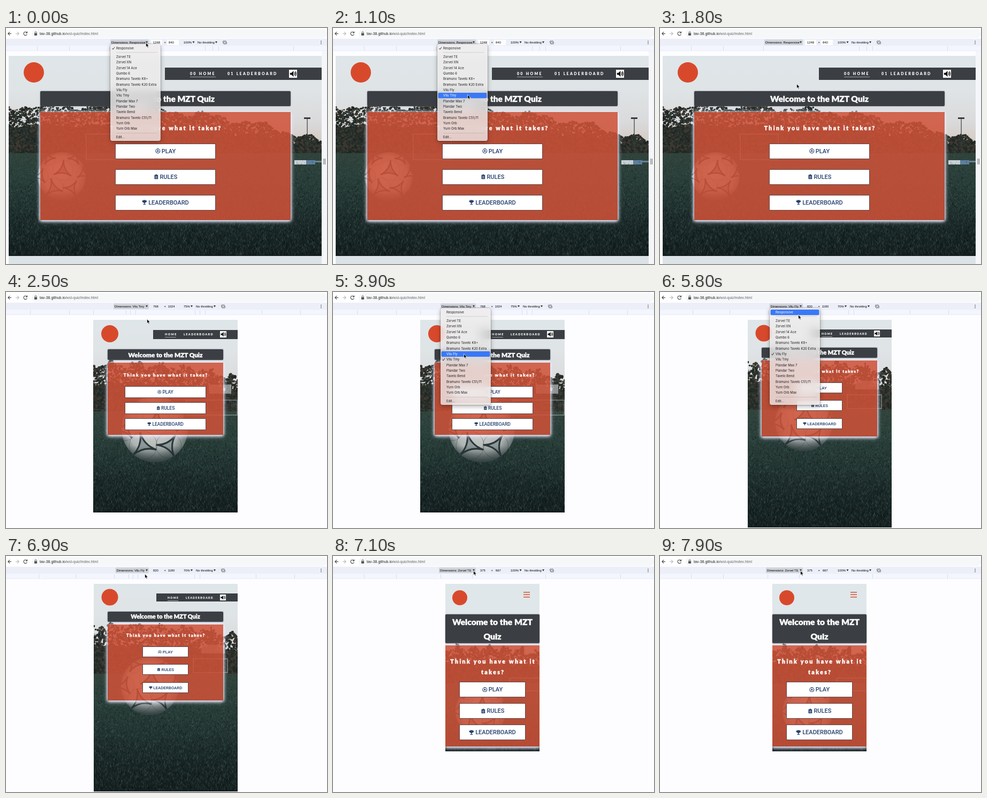
An HTML page with a canvas that plays this animation: 600x441 px, repeating every 8 s.

```html
<!DOCTYPE html>
<html lang="en">
<head>
<meta charset="utf-8">
<title>Responsive quiz page</title>
<style>
html, body { margin: 0; width: 100%; height: 100%; overflow: hidden; background: #fdfdff; }
#stage { position: relative; width: 600px; height: 441px; overflow: hidden; }
#stage > *, .scene > * { position: absolute; left: 0; top: 0; }
.ui { font-family: "Liberation Sans", Arial, sans-serif; }
.page { font-family: Lato, "Open Sans", sans-serif; font-weight: 900; fill: #fff; }
.bold { stroke: #fff; stroke-width: .4px; }
.glow { filter: drop-shadow(0 1px 2.5px #eef0ff) drop-shadow(0 1px 3px #e2e6ff); }
.scene .btn {
  box-sizing: border-box; display: flex; align-items: center; justify-content: center;
  background: #fff; border: 1px solid #5d4a4d; color: #25406f; fill: #25406f;
  font-family: Roboto, Arial, sans-serif; font-weight: 500; white-space: nowrap;
}
#menu {
  top: 30px; width: 94px; height: 181px; border-radius: 4px;
  background: rgba(238, 235, 236, .8); backdrop-filter: blur(9px);
  box-shadow: 0 0 0 .5px rgba(0, 0, 0, .35), 0 3px 8px rgba(0, 0, 0, .3);
  font-family: Inter, "Open Sans", sans-serif; font-size: 6px;
}
</style>
</head>
<body>
<div id="stage"></div>
<script>
const W = 600, H = 441, LOOP = 8000, STEP = 100;
const stage = document.getElementById('stage');
const WELCOME = 'Welcome to the MZT Quiz';
const ASK = 'Think you have what it takes?';

const ROWS = ['Responsive', 'Zorvel TE', 'Zorvel XN', 'Zorvel 14 Ace', 'Qumbo 6',
  'Bramuno Tavelo K8+', 'Bramuno Tavelo K20 Extra', 'Vilu Fly', 'Vilu Tiny',
  'Plandar Max 7', 'Plandar Two', 'Tavelo Bend', 'Bramuno Tavelo C51/71',
  'Yurn Orb', 'Yurn Orb Max', 'Edit...'];
const rowY = i => i === 0 ? 8 : i === 15 ? 173.5 : 24 + (i - 1) * 10.31;

const SCENES = [
  { from: 0, row: 0, size: [1248, 840], zoom: '100%', labelX: 197, menuX: 195,
    ticks: [58, 118, 193, 372, 386, 397, 537], page: [5, 52, 585, 374],
    logo: [52, 83, 19], nav: [297, 74, 293, 23], navFont: [7, 2.3, 88],
    links: [[344, '00 HOME', 48], [414, '01 LEADERBOARD']], icon: [529, 78, 15],
    title: [64, 118, 468, 28], head: [15.5, [138, WELCOME]],
    panel: [64, 157, 468, 202], ask: [10.5, 2.4, [191, ASK]],
    btn: [204, 188, 29, 11], btnY: [215.5, 263.5, 311.5],
    photo: { horizon: 236, trees: [146, 214], ball: [104, 277, 45], goal: [150, 221, 198, 48] } },
  { from: 1900, row: 8, size: [768, 1024], zoom: '75%', labelX: 203, menuX: 201,
    ticks: [45, 118, 163, 224, 232, 242, 353, 362, 372, 478, 550], page: [163, 52, 270, 360],
    logo: [194, 78, 16], nav: [275, 71, 158, 17], navFont: [5.5, 1.4, 81],
    links: [[297, 'HOME', 21], [332, 'LEADERBOARD']], icon: [400, 73, 12],
    title: [190, 107, 216, 20], head: [11.7, [122, WELCOME]],
    panel: [190, 132, 216, 135], ask: [8, 1.8, [158, ASK]],
    btn: [222, 152, 22, 8.5], btnY: [176, 206, 236],
    photo: { horizon: 225, trees: [135, 162], ball: [278, 256, 62], goal: [337, 432, 202, 28], board: [379, 173, 42, 17] } },
  { from: 4500, row: 7, size: [820, 1180], zoom: '70%', labelX: 206.5, menuX: 205,
    ticks: [61, 130, 202, 229, 237, 246, 352, 362, 467, 539], page: [164, 52, 269, 388],
    logo: [194, 77, 15.5], nav: [281, 70, 152, 15], navFont: [5.1, 1.3, 80],
    links: [[302, 'HOME', 20], [336, 'LEADERBOARD']], icon: [400, 72, 11],
    title: [190, 104, 216, 19], head: [10.9, [117, WELCOME]],
    panel: [190, 128, 216, 142], ask: [7.4, 1.7, [151, ASK]],
    btn: [255, 86, 20, 7.9], btnY: [169, 202, 236],
    photo: { horizon: 222, trees: [130, 150], ball: [269, 243, 54], goal: [350, 414, 192, 26], board: [365, 166, 44, 16] } },
  { from: 7000, row: 1, size: [375, 667], zoom: '100%', labelX: 200, menuX: 198,
    ticks: [58, 118, 201, 260, 397, 537], page: [210, 52, 176, 313],
    logo: [237, 78, 14],
    title: [210, 109, 176, 54], head: [15.7, [129, 'Welcome to the MZT'], [156, 'Quiz']],
    panel: [210, 167, 176, 189], ask: [10.5, 2.4, [201, 'Think you have what it'], [221, 'takes?']],
    btn: [236, 124, 29, 11], btnY: [235, 275, 315],
    photo: { horizon: 240, trees: [172, 182], ball: [276, 290, 47], goal: [330, 386, 228, 24] } }
];

const ICONS = {
  PLAY: '<circle cx="8" cy="8" r="6.6" fill="none" stroke="#25406f" stroke-width="1.8"/><path d="M8 5l2.800 2.100-1 3.200H6.200L5.200 7.100zM7.500 1h1v2h-1zM2 10l1.800-.6.4 1-1.500 1zM14 10l-1.800-.6-.4 1 1.500 1z"/>',
  RULES: '<path d="M2.500 2.500H6a2 2 0 0 1 4 0h3.500V15.500h-11z"/><path d="M5 7h6M5 9.500h6M5 12h6" stroke="#fff"/>',
  LEADERBOARD: '<path d="M4 1h8v1.500h3.500c0 4-2 5.500-4 5.800L9 10.500V13h3v2H4v-2h3v-2.500L4.500 8.300C2.500 8 .5 6.500.5 2.500H4z"/>'
};

const svg = (body, cls = '', w = W, h = H) =>
  `<svg class="${cls}" width="${w}" height="${h}" viewBox="0 0 ${w} ${h}">${body}</svg>`;
const rect = ([x, y, w, h], fill, more = '') =>
  `<rect x="${x}" y="${y}" width="${w}" height="${h}" fill="${fill}" ${more}/>`;
const text = (x, y, size, str, more = '') =>
  `<text x="${x}" y="${y}" font-size="${size}" ${more}>${str}</text>`;
const path = (d, more = '') => `<path d="${d}" ${more}/>`;
const line = (d, color, width = 1) => path(d, `fill="none" stroke="${color}" stroke-width="${width}"`);
const add = (tag, parent = stage) => parent.appendChild(document.createElement(tag));

function seeded(seed) {
  return () => {
    seed = seed + 0x6D2B79F5 | 0;
    let t = Math.imul(seed ^ seed >>> 15, 1 | seed);
    t = t + Math.imul(t ^ t >>> 7, 61 | t) ^ t;
    return ((t ^ t >>> 14) >>> 0) / 4294967296;
  };
}

function fade(c, y0, y1, colors) {
  const g = c.createLinearGradient(0, y0, 0, y1);
  colors.forEach((col, i) => g.addColorStop(i / (colors.length - 1), col));
  return g;
}

function drawTrees(c, rnd, [x, , w], { horizon, trees: [left, right] }) {
  const top = u => left + (right - left) * u ** 3 + 5 * Math.sin(u * 37) + 3 * Math.sin(u * 90);
  c.fillStyle = '#262d29';
  for (let i = 0; i < w; i++) {
    const y = top(i / w);
    c.fillRect(x + i, y + (horizon - y) * .4, 1, horizon - y);
  }
  for (let i = 0; i < w * 14; i++) {
    const u = rnd(), y = top(u);
    c.fillStyle = ['#242b27', '#2b312c', '#1d2624', '#43382f', '#353c35'][rnd() * 5 | 0];
    c.beginPath();
    c.arc(x + u * w, y + (horizon - y) * rnd(), .6 + rnd() * 2, 0, 7);
    c.fill();
  }
}

function drawGrass(c, rnd, x, y, w, h) {
  for (let i = 0; i < w * h / 9; i++) {
    const d = rnd(), px = x + rnd() * w, py = y + d * h, len = 1 + d * 4;
    c.strokeStyle = rnd() < .5 ? 'rgba(125,158,146,.17)' : 'rgba(3,10,10,.3)';
    c.beginPath();
    c.moveTo(px, py);
    c.lineTo(px + (rnd() - .5) * len * 1.5, py - len);
    c.stroke();
  }
}

function drawBall(c, [x, y, r]) {
  c.save();
  c.translate(x, y);
  c.scale(r, r);
  const g = c.createRadialGradient(-.2, -.3, .1, 0, 0, 1);
  g.addColorStop(0, '#d8dad6');
  g.addColorStop(.75, '#aeb5b2');
  g.addColorStop(1, '#667272');
  c.fillStyle = g;
  c.beginPath();
  c.arc(0, 0, 1, 0, 7);
  c.fill();
  c.clip();
  // Curved three-pointed panels with a light core.
  for (const [px, py, s, a] of [[-.35, .5, .42, .3], [.42, .5, .38, 1.1], [.9, -.1, .3, .5], [-.9, 0, .35, .9], [.05, -.25, .42, .6], [-.55, -.75, .3, 0], [.55, -.75, .3, 1]]) {
    const at = (k, q) => [px + q * Math.cos(a + k * Math.PI / 3), py + q * Math.sin(a + k * Math.PI / 3)];
    c.beginPath();
    c.moveTo(...at(0, s));
    for (let k = 1; k < 6; k += 2) c.quadraticCurveTo(...at(k, s * .05), ...at(k + 1, s));
    c.fillStyle = '#8d9898';
    c.fill();
    c.strokeStyle = '#2b363a';
    c.lineWidth = .05;
    c.stroke();
    c.beginPath();
    c.arc(px, py, s, 0, 7);
    c.strokeStyle = 'rgba(60,72,76,.5)';
    c.lineWidth = .015;
    c.stroke();
  }
  c.fillStyle = fade(c, .5, 1, ['rgba(28,42,42,0)', 'rgba(28,42,42,.7)']);
  c.fillRect(-1, .5, 2, .5);
  c.restore();
}

function drawPhoto(canvas, { page, photo }, seed) {
  canvas.width = W;
  canvas.height = H;
  const c = canvas.getContext('2d'), rnd = seeded(seed);
  const [x, y, w, h] = page, { horizon, ball, goal, board } = photo, bottom = y + h;
  c.beginPath();
  c.rect(x, y, w, h);
  c.clip();
  c.fillStyle = fade(c, y, horizon, ['#dfe6e9', '#dfe4e6', '#dadadb', '#d2c2b6']);
  c.fillRect(x, y, w, h);
  drawTrees(c, rnd, page, photo);
  c.fillStyle = fade(c, horizon - 4, bottom, ['#31443c', '#2a3f3a', '#223431', '#192726', '#141e1f']);
  c.fillRect(x, horizon - 2, w, h);
  if (w > 300) {
    c.fillStyle = '#353a3c';
    c.fillRect(562.5, 168, 1.2, 66);
    c.fillRect(557, 167, 12, 3);
    c.fillStyle = '#c9d2d8';
    c.fillRect(539, 247, 39, 8);
    c.fillStyle = '#5c7f9c';
    c.fillRect(561, 247, 17, 8);
    c.fillStyle = '#6d8391';
    c.fillRect(578, 248, 12, 3);
  }
  drawGrass(c, rnd, x, horizon, w, bottom - horizon);
  if (board) {
    c.fillStyle = 'rgba(205,212,214,.6)';
    c.fillRect(...board);
  }
  const [gx, gr, gy, gh] = goal;
  c.strokeStyle = 'rgba(225,232,232,.65)';
  c.strokeRect(gx, gy, gr - gx, gh);
  c.strokeStyle = 'rgba(225,235,235,.1)';
  for (let i = gx; i < gr; i += 4) { c.beginPath(); c.moveTo(i, gy); c.lineTo(i, gy + gh); c.stroke(); }
  drawBall(c, ball);
}

const caret = x => path(`M${x} 25h4l-2 3.600z`, 'fill="#333"');

function toolbar(s) {
  const wide = s.zoom === '100%', tx = wide ? 358 : 355, rx = wide ? 409 : 406;
  const field = s.row === 0 ? rect([271, 22, 21, 10], '#fff') + rect([301, 22, 22, 10], '#fff') : '';
  return s.ticks.map(x => rect([x, 34, .8, 8], '#ccd7ee')).join('') +
    rect([s.labelX - 2, 21.5, 269 - s.labelX, 10.5], '#d0d3da', 'rx="1.5"') + field +
    text(s.labelX, 28.8, 5.8, 'Dimensions: ' + ROWS[s.row]) + caret(261) +
    text(275, 28.8, 5.9, s.size[0]) + text(295.5, 28.8, 6, '×') +
    text(s.row === 0 || wide ? 304 : 302.5, 28.8, 5.9, s.size[1]) +
    text(332, 28.8, 5.9, s.zoom) + caret(wide ? 348.5 : 345) +
    text(tx, 28.8, 5.9, 'No throttling') + caret(tx + 33) +
    `<g transform="translate(${rx} 27)">` +
    rect([-1.5, -3, 3, 6], 'none', 'rx=".5" stroke="#333" stroke-width=".9" transform="rotate(40)"') +
    line('M-3.800 0a3.800 3.800 0 0 1 2.500-3.600M3.800 0a3.800 3.800 0 0 1-2.500 3.600', '#333', .8) + '</g>';
}

function navBar(s) {
  if (!s.nav) return [67, 71.500, 76].map(y => rect([356, y, 12, 1.5], '#d9502f')).join('');
  const [size, gap, y] = s.navFont, [ix, iy, iw] = s.icon;
  const [lx, , lw] = s.links[0];
  return rect(s.nav, '#3b3f43') +
    s.links.map(([x, str]) => text(x, y, size, str, `letter-spacing="${gap}"`)).join('') +
    rect([lx, y + 3.3, lw, .7], '#c9cccf') +
    `<g transform="translate(${ix} ${iy}) scale(${iw / 16})">` + rect([0, 0, 16, 16], '#fff') +
    path('M2 6h3l4-4v12l-4-4H2z', 'fill="#111"') + line('M11 5q2 3 0 6M12.500 3q3.500 5 0 10', '#111', 1.3) + '</g>';
}

function pageArt(s) {
  const cx = s.title[0] + s.title[2] / 2, mid = 'text-anchor="middle" class="bold"';
  const [hs, ...heads] = s.head, [as, gap, ...asks] = s.ask, [lx, ly, lr] = s.logo;
  const top = s.nav ? '' : rect([210, 52, 176, 57], '#dfe7ea');
  const next = s.row ? '' : rect([5, 426, 585, 15], '#dce3e7') +
    rect([590, 43, 10, 398], '#f5f6fa') + rect([593.5, 244, 1, 11], '#666') + rect([596, 244, 1, 11], '#666');
  return top + next + `<circle cx="${lx}" cy="${ly}" r="${lr}" fill="#d8492c"/>` + navBar(s) +
    rect(s.title, '#3b3f43', 'rx="2" style="filter:drop-shadow(0 0 1px #7a7f9a)"') +
    heads.map(([y, str]) => text(cx, y, hs, str, mid)).join('') +
    `<g clip-path="url(#hole${s.row})">` + rect(s.panel, '#fff', 'class="glow"') + '</g>' +
    rect(s.panel, '#d05238', 'fill-opacity=".86"') +
    asks.map(([y, str]) => text(cx + gap / 2, y, as, str, `${mid} letter-spacing="${gap}"`)).join('');
}

// Keeps the glow outside the panel so the photo shows through.
function holeClip({ row, page: [x, y, w, h], panel: [px, py, pw, ph] }) {
  return `<clipPath id="hole${row}"><path clip-rule="evenodd" d="M${x} ${y}h${w}v${h}h${-w}zM${px} ${py}h${pw}v${ph}h${-pw}z"/></clipPath>`;
}

function buildScene(s, i) {
  const node = add('div');
  node.className = 'scene';
  const [x, w, h, size] = s.btn;
  const buttons = Object.keys(ICONS).map((name, k) =>
    `<div class="btn" style="left:${x}px;top:${s.btnY[k]}px;width:${w}px;height:${h}px;font-size:${size}px">` +
    `<svg width="${size * .88}" height="${size * .88}" viewBox="0 0 16 16" style="margin-right:${size * .2}px">${ICONS[name]}</svg>${name}</div>`);
  node.innerHTML = '<canvas></canvas>' + svg(holeClip(s) + pageArt(s), 'page') +
    svg(toolbar(s), 'ui') + buttons.join('');
  drawPhoto(node.firstChild, s, 11 + i);
  return node;
}

function buildChrome() {
  const box = add('div');
  box.innerHTML = svg(
    rect([0, 0, W, 20], '#fff') + rect([48, 2, 552, 17], '#f6f7f9', 'rx="8"') +
    rect([0, 20, W, 13.5], '#eceff8') + rect([0, 33.5, W, 9.5], '#f3f6fe') + rect([0, 42.5, W, .5], '#dfe5f2') +
    line('M10 10.500H4M7 7.300l-3.200 3.200L7 13.700', '#444', 1.1) +
    line('M18 10.500h6M21 7.300l3.200 3.200-3.200 3.200', '#b5b8bc', 1.1) +
    line('M39 8.500a3.300 3.300 0 1 0 .4 3.300M39.500 6.500v2.700h-2.700', '#444', 1.1) +
    rect([53, 9.5, 5, 4.5], '#555', 'rx=".6"') + line('M54 9.500V8.300a1.500 1.500 0 0 1 3 0v1.200', '#555', .9) +
    text(63, 13, 7, 'tav-38.github.io<tspan fill="#5f6368">/wsl-quiz/index.html</tspan>', 'fill="#222"') +
    [24.5, 27, 29.5].map(y => `<circle cx="589" cy="${y}" r=".8" fill="#444"/>`).join(''), 'ui');
}

function buildMenu() {
  const menu = add('div');
  menu.id = 'menu';
  menu.innerHTML = svg(ROWS.map((name, i) =>
    `<g>${rect([1.5, rowY(i) - 5.15, 91, 10.3], '#3a78f6', 'rx="2"')}` +
    line(`M3.500 ${rowY(i)}l1.600 2 2.800-4.200`, 'currentColor', .9) +
    text(11, rowY(i) + 2.1, 6, name, 'fill="currentColor"') + '</g>').join('') +
    [15.5, 166].map(y => rect([11, y, 77, .6], 'rgba(0,0,0,.2)')).join(''), '', 94, 181);
  return menu;
}

const MENU_OPEN = [[0, 1500], [3000, 4300], [5300, 6400]];
// time, x, y of the pointer tip
const POINTER = [[0, 261, 25], [200, 261, 25], [600, 256, 82], [1000, 251, 122], [1500, 251, 122],
  [2100, 259, 82], [2500, 263, 48], [2800, 261, 25], [3100, 261, 26], [3600, 247, 104], [3900, 244, 113],
  [4300, 244, 113], [4800, 256, 56], [5100, 260, 26], [5400, 260, 27], [5800, 258, 40], [6100, 256, 52],
  [6400, 256, 52], [6900, 259, 31], [7100, 262, 25], [LOOP, 262, 25]];

function pointerAt(t) {
  const i = POINTER.findIndex(p => p[0] > t);
  const [t0, x0, y0] = POINTER[i - 1], [t1, x1, y1] = POINTER[i];
  const u = (t - t0) / (t1 - t0), e = u * u * (3 - 2 * u);
  return [x0 + (x1 - x0) * e, y0 + (y1 - y0) * e];
}

buildChrome();
const scenes = SCENES.map(buildScene);
const menu = buildMenu();
const rows = [...menu.querySelectorAll('g')];
const pointer = add('div');
pointer.innerHTML = svg(path('M.5.5v8.200l1.900-1.700 1.300 3 1.500-.7-1.300-2.900h2.600z',
  'fill="#111" stroke="#fff" stroke-width=".7"'), '', 9, 12);

function render(t) {
  const now = SCENES.findLastIndex(s => s.from <= t), s = SCENES[now];
  scenes.forEach((node, i) => node.style.display = i === now ? '' : 'none');
  const [x, y] = pointerAt(t);
  pointer.style.transform = `translate(${x}px, ${y}px)`;
  menu.style.display = MENU_OPEN.some(([a, b]) => t >= a && t < b) ? '' : 'none';
  menu.style.left = s.menuX + 'px';
  rows.forEach((row, i) => {
    const hot = Math.abs(y - 30 - rowY(i)) < 5.15;
    row.style.color = hot ? '#fff' : '#1d1d1f';
    row.children[0].style.display = hot ? '' : 'none';
    row.children[1].style.display = i === s.row ? '' : 'none';
  });
}

const start = performance.now();
function tick() {
  const t = (performance.now() - start) % LOOP;
  render(Math.floor(t / STEP) * STEP);
  requestAnimationFrame(tick);
}
render(0);
tick();
</script>
</body>
</html>
```
